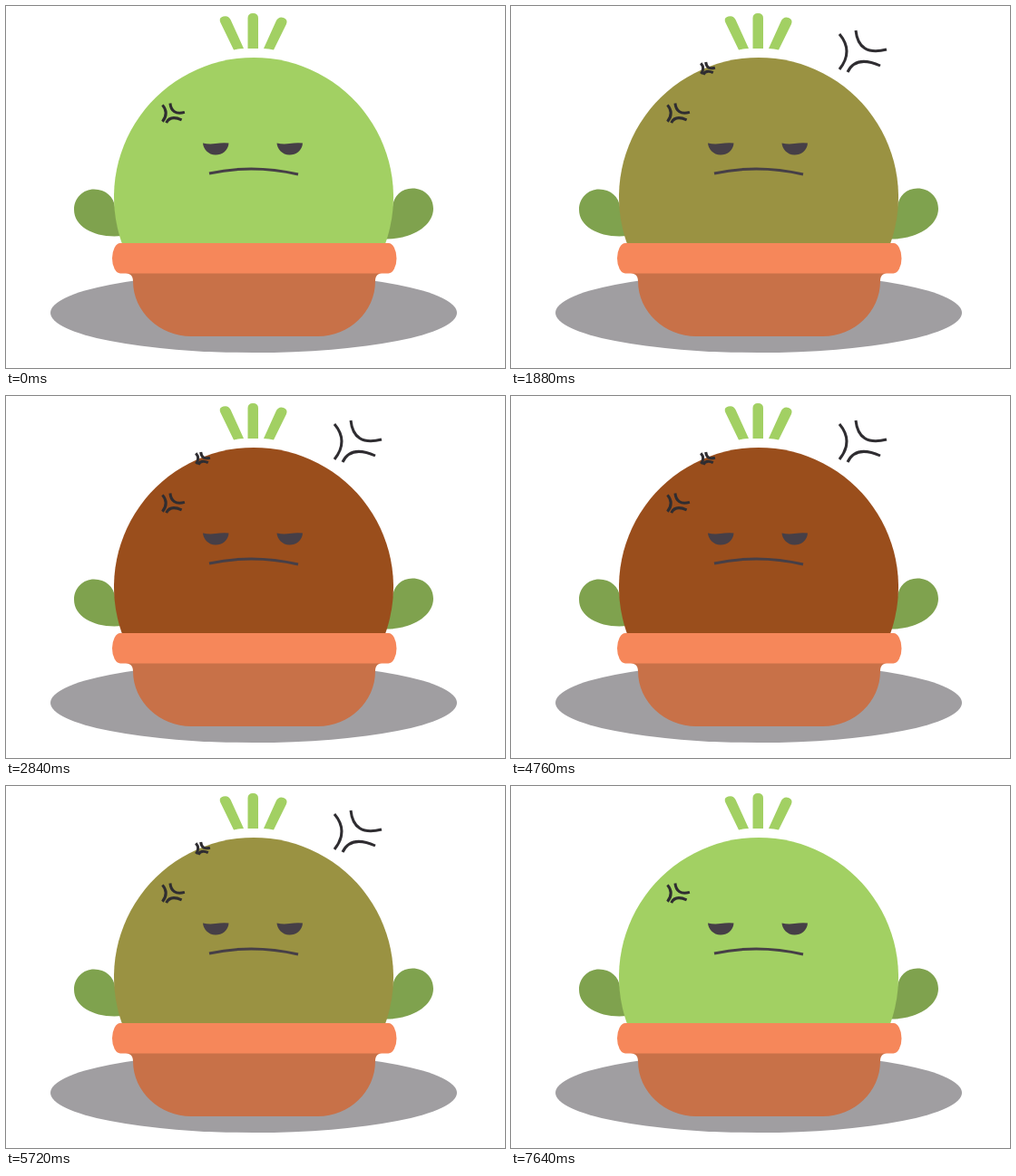
These frames come from a looping animation (550x400 px, 7680 ms). An HTML page:

```html
<!DOCTYPE html>
<html lang="en">
<head>
<meta charset="utf-8">
<title>Grumpy cactus</title>
<style>
  html, body { margin: 0; width: 100%; height: 100%; overflow: hidden; background: #fff; }
  svg { display: block; width: 550px; height: 400px; }
  .leaf { fill: #a2d063; }
  .arm { fill: #7fa24e; }
  .face { fill: #463f47; }
  .mouth { fill: none; stroke: #463f47; stroke-width: 3; }
  .mark { fill: none; stroke: #2f2d31; stroke-width: 3; }
  .mark path, .mark use { vector-effect: non-scaling-stroke; }

  /* Eight equal moods, the first one entered 40 ms in */
  .body, .second, .third { animation: 7680ms step-end -40ms infinite; }
  .body { animation-name: temper; }
  .second { animation-name: second; }
  .third { animation-name: third; }

  @keyframes temper {
    0%, 100% { fill: #a2d063; }
    12.5%, 87.5% { fill: #9eb152; }
    25%, 75% { fill: #9a9242; }
    37.5%, 62.5% { fill: #9a4e1c; }
    50% { fill: #992a1c; }
  }
  @keyframes second {
    0%, 100% { visibility: hidden; }
    12.5% { visibility: visible; }
  }
  @keyframes third {
    0%, 75%, 100% { visibility: visible; }
    0%, 87.5%, 100% { visibility: hidden; }
    25% { visibility: visible; }
  }
</style>
</head>
<body>
<svg viewBox="0 0 550 400">
  <defs>
    <path id="anger" vector-effect="non-scaling-stroke"
      d="M1 4Q17 23 1 43M19 0Q22 29 53 21M10 46Q19 27 46 39"/>
    <path id="eye" d="M217 151.5Q224 153 231 152T245.500 151.500C245 160 238 164.500 231 164.500C223 164.500 217.500 158 217 151.500Z"/>
  </defs>

  <ellipse cx="273" cy="339" rx="224" ry="44" fill="#a09ea1"/>

  <g class="arm">
    <path d="M128 254C100 257 75 245 75 225C75 212 85 202.500 97 202.500C110 202.500 119 211 120 222Z"/>
    <path d="M418 257.500C447 258 471 243 471 224C471 211 461 201.500 448 201.500C436 201.500 427 210 426 222Z"/>
  </g>

  <g class="leaf">
    <path d="M251 48.500L236.500 18.500Q234 13 239.500 11.500Q245 10 247.500 15L262 47Q256 47 251 48.500Z"/>
    <path d="M266.500 47V13.500Q266.500 8 272.250 8T278 13.500V47Z"/>
    <path d="M284 47L298 16Q301 11 306 13Q311 15 309 20L295 48.500Q290 47 284 47Z"/>
  </g>

  <path class="body" d="M127.700 262A154 154 0 1 1 418.300 262Z"/>

  <path fill="#c87148" d="M132 295C138 296 140 299 140 304C140 338 170 365 204 365H344C378 365 407 338 407 304C407 299 409 296 414 295Z"/>
  <rect x="117" y="262" width="313.500" height="33.500" rx="9" ry="16.750" fill="#f6875a"/>

  <g class="face">
    <use href="#eye"/>
    <use href="#eye" x="81.500"/>
  </g>
  <path class="mouth" d="M224 185Q272 174.500 322 186"/>

  <g class="mark">
    <use href="#anger" transform="translate(172 107.500) scale(.47)"/>
    <use class="second" href="#anger" transform="translate(209 62) scale(.3)"/>
    <use class="third" href="#anger" transform="translate(361 27)"/>
  </g>
</svg>
</body>
</html>
```
